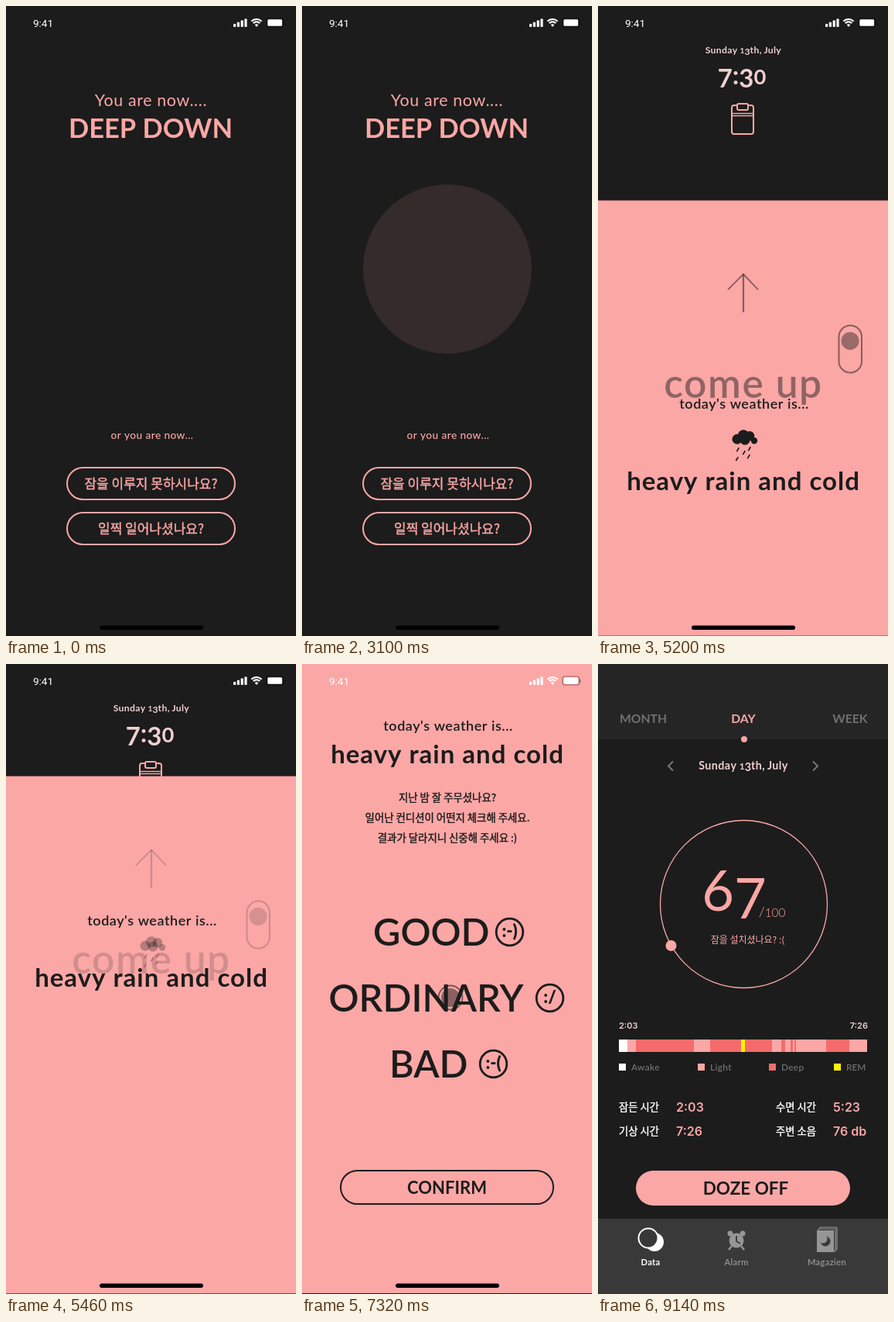
An HTML page with a canvas for the animation above (10 s loop, 375 by 812 pixels).

```html
<!DOCTYPE html>
<html lang="ko">
<head>
<meta charset="utf-8">
<title>Sleep check</title>
<style>
  html, body { margin: 0; width: 100%; height: 100%; overflow: hidden; background: #1c1c1c; }
  canvas { display: block; }
</style>
</head>
<body>
<canvas id="stage" width="375" height="812"></canvas>
<script>
const W = 375, H = 812, LOOP = 10000;
const DARK = '#1c1c1c', PINK = '#fba7a6', DEEP = '#f56b6b', GRAY = '#707070', PALE = '#f0d0d0';
const LATIN = 'Lato, "Open Sans", sans-serif';
const KOREAN = '"Noto Sans CJK KR", "Noto Sans CJK", sans-serif';
const FIGURES = 'Inter, Roboto, sans-serif';

const stage = document.getElementById('stage').getContext('2d');
const layer = document.createElement('canvas');
layer.width = W;
layer.height = H;
const layerCtx = layer.getContext('2d');
let c = stage;

const clamp = v => Math.max(0, Math.min(1, v));
const ramp = (t, from, to) => clamp((t - from) / (to - from));

function faded(alpha, draw) {
  if (alpha <= 0) return;
  c.save();
  c.globalAlpha *= alpha;
  draw();
  c.restore();
}

function shifted(dy, draw) {
  c.save();
  c.translate(0, dy);
  draw();
  c.restore();
}

// Lowercase Latin is set slightly loose.
function setFont(s, size, weight, family) {
  const loose = family === LATIN && /[a-z]/.test(s);
  c.font = `${weight} ${size}px ${family}`;
  c.letterSpacing = loose ? `${size * 0.03}px` : '0px';
}

function text(s, x, y, size, weight, color, align = 'center', family = LATIN) {
  setFont(s, size, weight, family);
  c.textAlign = align;
  c.fillStyle = color;
  c.fillText(s, x, y);
}

// A hairline outline gives the regular cut a medium weight.
function korean(s, x, y, size, color, align = 'center') {
  text(s, x, y, size, 500, color, align, KOREAN);
  c.strokeStyle = color;
  c.lineWidth = 0.4;
  c.strokeText(s, x, y);
}

// Text with old-style figures: 0-2 at x-height, 3 4 5 7 9 hanging.
function oldStyle(s, x, y, size, weight, color, align = 'center') {
  const glyphs = [...s].map(ch => {
    const px = /[012]/.test(ch) ? size * 0.83 : size;
    setFont(ch, px, weight, LATIN);
    return { ch, px, w: c.measureText(ch).width, drop: /[34579]/.test(ch) ? size * 0.15 : 0 };
  });
  const total = glyphs.reduce((sum, g) => sum + g.w, 0);
  if (align === 'center') x -= total / 2;
  for (const g of glyphs) {
    text(g.ch, x, y + g.drop, g.px, weight, color, 'left');
    x += g.w;
  }
}

function box(x, y, w, h, color) {
  c.fillStyle = color;
  c.fillRect(x, y, w, h);
}

function round(x, y, w, h, r, fill, stroke, width = 2) {
  c.beginPath();
  c.roundRect(x, y, w, h, r);
  paint(fill, stroke, width);
}

function disc(x, y, r, fill, stroke, width = 2) {
  c.beginPath();
  c.arc(x, y, r, 0, Math.PI * 2);
  paint(fill, stroke, width);
}

function paint(fill, stroke, width) {
  if (fill) { c.fillStyle = fill; c.fill(); }
  if (stroke) { c.strokeStyle = stroke; c.lineWidth = width; c.stroke(); }
}

function line(points, color, width = 2) {
  c.beginPath();
  for (let i = 0; i < points.length; i += 2) c.lineTo(points[i], points[i + 1]);
  paint(null, color, width);
}

function statusBar() {
  text('9:41', 48, 26.5, 13.6, 400, '#fff', 'center', 'Roboto, sans-serif');
  for (let i = 0; i < 4; i++) round(294 + i * 4.8, 23 - i * 2.2, 3.2, 4 + i * 2.2, 0.8, '#fff');
  for (const r of [9, 5.6]) {
    c.beginPath();
    c.arc(324, 26, r, -Math.PI * 0.76, -Math.PI * 0.24);
    paint(null, '#fff', 2.2);
  }
  c.beginPath();
  c.moveTo(324, 27);
  c.arc(324, 26.5, 3, -Math.PI * 0.76, -Math.PI * 0.24);
  paint('#fff');
  faded(0.4, () => {
    round(337, 16, 21.5, 11, 3, null, '#000', 1.2);
    box(359, 20, 1.3, 4, '#000');
  });
  round(338.3, 17.3, 18.8, 8.4, 1.5, '#fff');
}

function homeBar() {
  round(121, 798.5, 134, 5.5, 2.75, '#000');
}

function pill(y, label) {
  round(79, y, 217, 41, 20.5, null, PINK);
  korean(label, 187.5, y + 27, 17, PINK);
}

function glowScreen(t) {
  box(0, 0, W, H, DARK);
  text('You are now....', 187.5, 129, 21.4, 400, PINK);
  text('DEEP DOWN', 187, 170, 34.5, 700, PINK);

  const outer = t < 1120 ? 0 : t < 1180 ? 0.11 : t < 3100 ? 0.21 : t < 3200 ? 0.11 : 0;
  const inner = 0.097 * ramp(t, 20, 1040) * (1 - ramp(t, 1680, 2940));
  faded(outer, () => disc(188, 339, 109, PINK));
  faded(inner, () => disc(188, 339, 83, PINK));

  text('or you are now...', 189, 558, 13.7, 500, PINK);
  pill(595, '잠을 이루지 못하시나요?');
  pill(653, '일찍 일어나셨나요?');
  statusBar();
  homeBar();
}

function clipboard() {
  round(173, 128, 28, 37, 3, null, PINK);
  line([173, 138.5, 201, 138.5], PINK, 1.4);
  line([173, 141.5, 201, 141.5], PINK, 1.4);
  round(180, 126, 14, 8, 2, DARK, PINK);
}

function rainCloud() {
  for (const [x, y, r] of [[180, 560, 6.5], [188, 555, 7], [196, 556, 6.2], [202, 562, 4.2], [190, 561, 6.5]])
    disc(x, y, r, DARK);
  for (const [x, y] of [[181, 571], [189, 575], [196, 570], [180, 583], [195, 580]])
    line([x + 1.3, y, x - 1.7, y + 5], DARK, 1.6);
}

function comeUp() {
  line([188, 346, 188, 395], DARK, 2.2);
  line([168, 366, 188, 346, 207, 366], DARK, 1.8);
  faded(0.92, () => text('come up', 188, 505, 51.5, 600, DARK));
  round(311.5, 412, 29.5, 61, 14.75, null, DARK, 2);
  faded(0.83, () => disc(326, 432, 11.5, DARK));
}

function mood(label, x, base, cx, face) {
  text(label, x, base, 48.6, 600, DARK, 'left');
  disc(cx, base - 17.5, 17.3, null, DARK, 2.8);
  text(face, cx, base - 11, 22, 900, DARK);
}

function question(chosen) {
  ['지난 밤 잘 주무셨나요?', '일어난 컨디션이 어떤지 체크해 주세요.', '결과가 달라지니 신중해 주세요 :)']
    .forEach((s, i) => korean(s, 188, 177 + i * 26, 13.4, DARK));
  const rest = 1 - 0.74 * chosen;
  faded(rest, () => mood('GOOD', 92, 363, 268.5, ':-)'));
  mood('ORDINARY', 34.5, 448, 320.5, ':/');
  faded(rest, () => mood('BAD', 113, 533, 247.5, ':-('));
  round(50, 653, 275, 43, 21.5, null, DARK);
  faded(chosen, () => round(50, 653, 275, 43, 21.5, DARK));
  text('CONFIRM', 187.5, 683, 22, 700, DARK);
  faded(chosen, () => text('CONFIRM', 187.5, 683, 22, 700, PINK));
}

function morningScreen(t) {
  const p = ramp(t, 4820, 5820), left = 1 - p;
  box(0, 0, W, H, DARK);
  oldStyle('Sunday 13th, July', 188, 61, 12.2, 700, PALE);
  oldStyle('7:30', 186, 100.5, 33, 700, PALE);
  clipboard();

  const top = -1.8 + 407.8 * left;
  box(0, top, W, H - 1 + left - top, PINK);
  faded(1 - ramp(p, 0, 0.8), () => shifted(top - 251, comeUp));
  shifted(700 * left, () => text("today's weather is...", 189, 86, 18, 600, DARK));
  faded(1 - ramp(p, 0.4, 0.75), () => shifted(750 * (0.38 - p) - 1, rainCloud));
  shifted(801 * left, () => text('heavy rain and cold', 188, 128, 33, 700, DARK));

  const chosen = ramp(t, 7330, 7720);
  faded(ramp(p, 0.865, 1), () => shifted(840 * left, () => question(chosen)));
  if (p === 1) faded(1 - chosen, () => {
    faded(0.5, () => disc(192, 430, 12, DARK));
    faded(0.6, () => disc(192, 430, 15.5, null, DARK, 1.8));
  });
  statusBar();
  homeBar();
}

function sleepBar() {
  box(27, 484, 321, 16, PINK);
  box(27, 484, 11, 16, '#fff');
  for (const [a, b] of [[49, 124], [145, 225], [237, 242], [249, 252], [254, 256], [295, 325]])
    box(a, 484, b - a, 16, DEEP);
  box(185, 484, 5, 16, '#fff200');
}

function legend(x, label, color) {
  box(x, 515, 9, 9, color);
  text(label, x + 16, 524, 11.8, 600, GRAY, 'left');
}

function stat(x, y, label, value) {
  korean(label, x, y, 13.3, '#fff', 'left');
  text(value, x + 74, y + 1, 16, 600, PINK, 'left', FIGURES);
}

function tabIcons() {
  const g = '#969696', bar = '#393939';
  disc(73, 745, 12, '#fff');
  disc(65, 740, 12.5, bar, '#fff', 2);

  disc(179, 743, 9.5, g);
  disc(171, 734, 3.5, g);
  disc(187, 734, 3.5, g);
  line([173, 750, 169, 755], g, 2.4);
  line([185, 750, 189, 755], g, 2.4);
  line([179, 737, 179, 744, 184, 747], bar, 1.8);

  round(287, 726, 22, 29, 1, null, g, 1.2);
  round(285, 728, 22, 29, 1, bar, g, 1.2);
  box(283, 730, 22, 28, g);
  disc(294, 744, 6.5, bar);
  disc(291, 741, 5.5, g);
}

function resultScreen() {
  box(0, 0, W, H, DARK);
  box(0, 0, W, 97, '#252525');
  text('MONTH', 28, 76, 15.7, 700, GRAY, 'left');
  text('DAY', 188, 76, 15.7, 700, PINK);
  text('WEEK', 348.5, 76, 15.7, 700, GRAY, 'right');
  disc(189, 97, 4, PINK);
  oldStyle('Sunday 13th, July', 188, 136, 14.3, 700, PALE);
  line([97, 125.5, 91, 131.5, 97, 137.5], '#777', 2);
  line([278, 125.5, 284, 131.5, 278, 137.5], '#777', 2);

  disc(188.5, 309.5, 108, null, PINK, 1.3);
  disc(94.5, 363, 7, PINK);
  oldStyle('67', 176, 317.5, 72, 400, PINK);
  oldStyle('/100', 225, 326, 18.5, 300, PINK);
  text('잠을 설치셨나요? :(', 193.5, 360, 12, 400, PINK, 'center', KOREAN);

  text('2:03', 27, 470, 11, 600, PALE, 'left', FIGURES);
  text('7:26', 349, 470, 11, 600, PALE, 'right', FIGURES);
  sleepBar();
  legend(27, 'Awake', '#fff');
  legend(129, 'Light', PINK);
  legend(221, 'Deep', DEEP);
  legend(305, 'REM', '#fff200');

  stat(27, 576, '잠든 시간', '2:03');
  stat(27, 607, '기상 시간', '7:26');
  stat(230, 576, '수면 시간', '5:23');
  stat(230, 607, '주변 소음', '76 db');

  round(49, 653, 277, 45, 22.5, PINK);
  text('DOZE OFF', 191, 684, 22.5, 700, DARK);

  box(0, 715, W, 97, '#393939');
  tabIcons();
  text('Data', 68, 775, 11.2, 700, '#fff');
  text('Alarm', 179, 775, 11.2, 600, '#969696');
  text('Magazien', 296, 775, 11.2, 600, '#969696');
}

function blend(alpha, draw) {
  c = layerCtx;
  draw();
  c = stage;
  faded(alpha, () => c.drawImage(layer, 0, 0));
}

function render(t) {
  const wake = ramp(t, 3340, 3700), result = ramp(t, 8220, 9140);
  if (wake < 1) glowScreen(t);
  if (wake === 1 && result < 1) morningScreen(t);
  if (wake > 0 && wake < 1) blend(1 - (1 - wake) ** 2, () => morningScreen(t));
  if (result === 1) resultScreen();
  else if (result > 0) blend(result, resultScreen);
}

const start = performance.now();
function tick() {
  render((performance.now() - start) % LOOP);
  requestAnimationFrame(tick);
}
tick();
</script>
</body>
</html>
```
